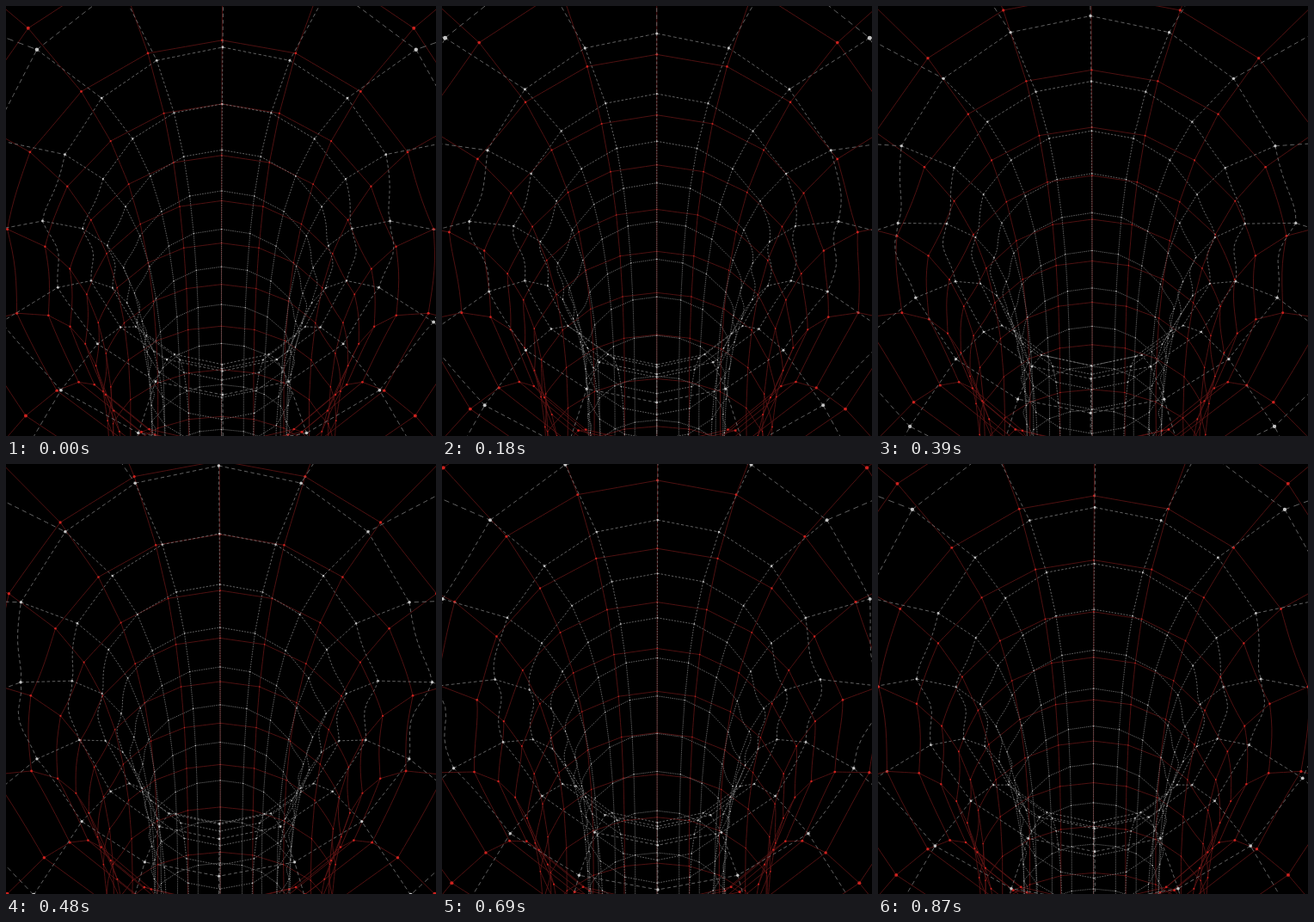
An HTML page with a canvas that plays this animation: 500x500 px, repeating every 900 ms.

```html
<!DOCTYPE html>
<html lang="en">
<head>
<meta charset="utf-8">
<title>Wireframe tunnel</title>
<style>
html, body { margin: 0; width: 100%; height: 100%; overflow: hidden; background: #000; }
canvas { display: block; width: 500px; height: 500px; }
</style>
</head>
<body>
<canvas id="stage" width="500" height="500"></canvas>
<script>
const ctx = document.getElementById('stage').getContext('2d');
const LOOP = 900, TICK = 30, TAU = Math.PI * 2, DEGREE = Math.PI / 180;
const SIDES = 16, STEP = 10.5 * DEGREE;
const FOCAL = 423, BACK = 0.628, NEAR = 0.03;
const FIRST = -4, LAST = 13, PARTS = 8;

// Two nested tori of major radius 1, seen from inside the tube.
const tubes = [
  {
    radius: 0.48, drift: 1, shift: 0.05, line: '#5e1515', dot: '#cc221e', dotSize: 2.5,
    wave: { middle: 780, range: 500, spread: 25 }
  },
  {
    radius: 0.3, drift: -1, shift: 0, line: '#747474', dot: '#c4c4c4', dotSize: 1.8,
    wave: { middle: 725, range: 755, spread: 19 }, dashed: true
  }
];

function vertex(tube, ring, side) {
  const turn = side * TAU / SIDES;
  const reach = 1 + tube.radius * Math.cos(turn);
  return {
    x: tube.radius * Math.sin(turn),
    y: 1 - reach * Math.cos(ring * STEP),
    z: BACK + reach * Math.sin(ring * STEP),
    turn
  };
}

function mix(a, b, k) {
  const blend = key => a[key] + (b[key] - a[key]) * k;
  return { x: blend('x'), y: blend('y'), z: blend('z'), turn: blend('turn') };
}

function clip(a, b) {
  return a.z >= NEAR ? a : mix(a, b, (NEAR - a.z) / (b.z - a.z));
}

// Sideways ripple that travels around the tube wall, plus a small sway.
function ripple(turn, wave, time) {
  const angle = Math.min(turn, TAU - turn) / DEGREE;
  const crest = wave.middle + wave.range * Math.tanh((angle - 96) / wave.spread);
  const sway = 0.0034 * Math.abs(Math.cos(turn)) * Math.cos(TAU * (time + 50) / LOOP);
  return sway + 0.0082 * Math.sin(turn) ** 2 * Math.cos(TAU * (time - crest) / LOOP);
}

function project(p, tube, time) {
  return {
    x: 249.8 + FOCAL * (p.x + ripple(p.turn, tube.wave, time)) / p.z,
    y: 250 + FOCAL * p.y / p.z
  };
}

function outside(a, b, margin) {
  return Math.max(a.x, b.x) < -margin || Math.min(a.x, b.x) > 500 + margin ||
    Math.max(a.y, b.y) < -margin || Math.min(a.y, b.y) > 500 + margin;
}

function drawEdge(a, b, tube, time) {
  if (a.z < NEAR && b.z < NEAR) return;
  const from = clip(a, b), to = clip(b, a);
  if (outside(project(from, tube, time), project(to, tube, time), 20)) return;
  const depth = (from.z + to.z) / 2;
  ctx.setLineDash(tube.dashed ? [2.2 / depth, 1.6 / depth] : []);
  ctx.beginPath();
  for (let i = 0; i <= PARTS; i++) {
    const p = project(mix(from, to, i / PARTS), tube, time);
    ctx.lineTo(p.x, p.y);
  }
  ctx.stroke();
}

function drawDot(point, tube, time) {
  if (point.z < NEAR) return;
  const p = project(point, tube, time);
  const size = Math.min(5, Math.max(1.3, tube.dotSize / point.z));
  ctx.beginPath();
  ctx.arc(p.x, p.y, size / 2, 0, TAU);
  ctx.fill();
}

function drawTube(tube, time) {
  const offset = tube.shift + tube.drift * time / LOOP;
  ctx.strokeStyle = tube.line;
  ctx.fillStyle = tube.dot;
  ctx.lineWidth = 0.85;
  const rings = [];
  for (let i = FIRST; i <= LAST; i++) {
    rings.push(Array.from({ length: SIDES + 1 }, (_, side) => vertex(tube, i + offset, side)));
  }
  rings.forEach((ring, i) => {
    for (let side = 0; side < SIDES; side++) {
      drawEdge(ring[side], ring[side + 1], tube, time);
      if (i + 1 < rings.length) drawEdge(ring[side], rings[i + 1][side], tube, time);
    }
  });
  rings.forEach(ring => ring.slice(0, SIDES).forEach(point => drawDot(point, tube, time)));
}

function draw(now) {
  const time = Math.floor((now % LOOP) / TICK) * TICK;
  ctx.fillStyle = '#000';
  ctx.fillRect(0, 0, 500, 500);
  tubes.forEach(tube => drawTube(tube, time));
}

const began = performance.now();
function frame() {
  draw(performance.now() - began);
  requestAnimationFrame(frame);
}
frame();
</script>
</body>
</html>
```
